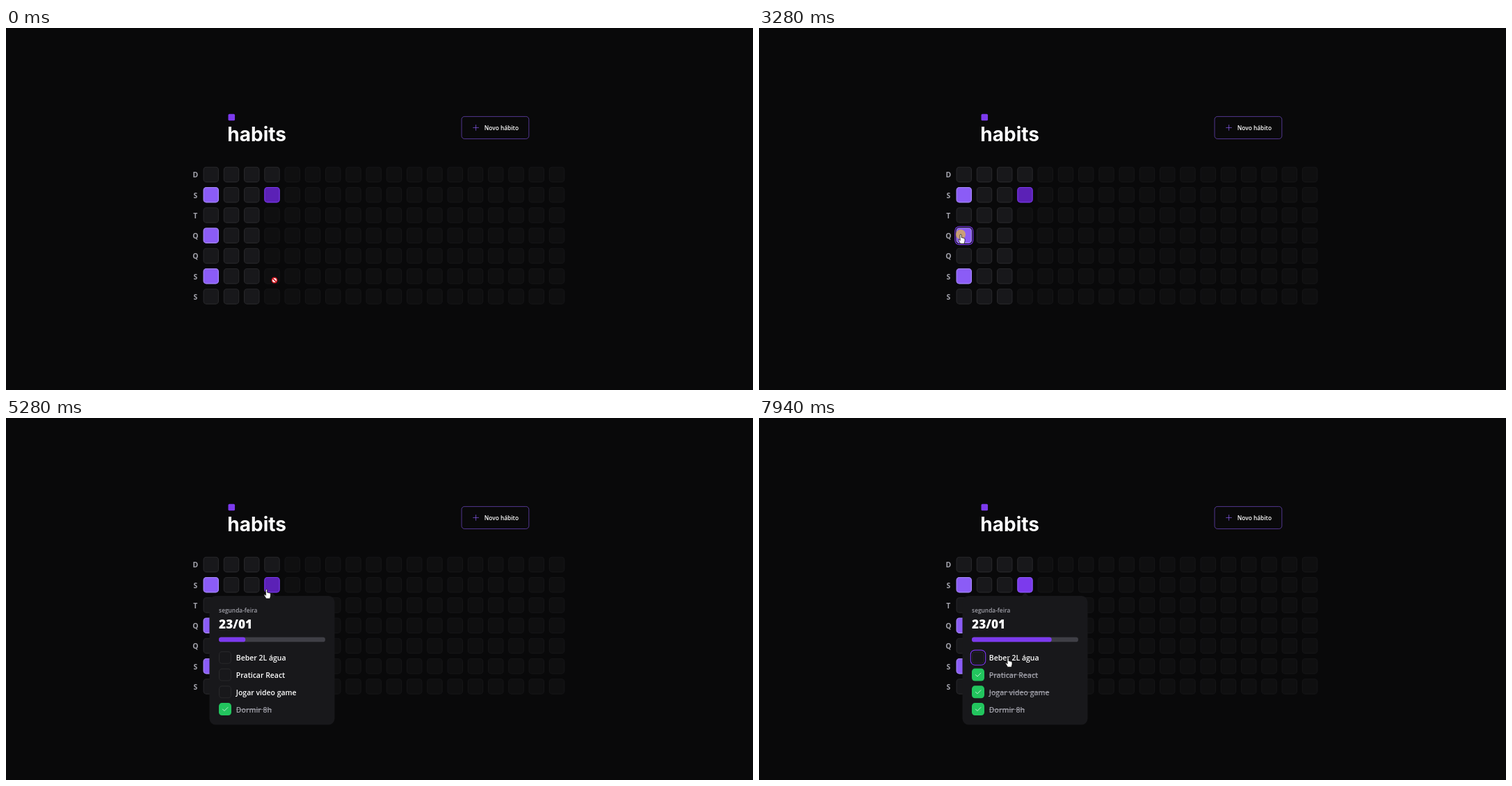
Recreate the animation shown at these times as an HTML page. Size 1074 by 521 pixels, loop 8000 ms.

```html
<!DOCTYPE html>
<html lang="pt-BR">
<head>
<meta charset="utf-8">
<title>habits</title>
<style>
* { box-sizing: border-box; }
html, body { margin: 0; width: 100%; height: 100%; overflow: hidden; background: #09090a; }
body { position: relative; }

/* Laid out at full page size, shown at 9/16 scale. */
#app {
  position: absolute; left: 0; top: 0; width: 1909px; height: 926px;
  transform: scale(.5625); transform-origin: 0 0;
  font: 600 14.8px/24px "Open Sans", "Noto Sans", sans-serif; color: #fff;
}
#app > * { position: absolute; }
span { position: relative; top: 1px; white-space: nowrap; }
svg { display: block; overflow: visible; fill: none; stroke-width: 1.25; stroke-linecap: round; stroke-linejoin: round; }

.mark { left: 568px; top: 219.5px; width: 17px; height: 17px; border-radius: 3px; background: #7c3aed; }
.title { left: 565.9px; top: 247.6px; font: 700 49.8px/1 Inter, sans-serif; }
.new {
  left: 1164px; top: 225.5px; width: 173px; height: 58px;
  display: flex; align-items: center; justify-content: center; gap: 12px;
  border: 1px solid #8b5cf6; border-radius: 8px;
}
.new svg { stroke: #8b5cf6; }

.day {
  width: 40px; height: 40px; display: flex; align-items: center; justify-content: center;
  font-size: 18.6px; font-weight: 700; color: #a1a1aa;
}
.cell { width: 40px; height: 40px; border: 2px solid #27272a; border-radius: 8px; background: #18181b; }
.off { opacity: .4; }
.full { background: #8b5cf6; border-color: #a78bfa; }
.ring { box-shadow: 0 0 0 2px #09090a, 0 0 0 4px #7c3aed; }

.pop { width: 320px; padding: 24px; border-radius: 16px; background: #18181b; z-index: 1; }
.pop::before {
  content: ""; position: absolute; left: 152px; top: -8px; width: 16px; height: 8px;
  background: inherit; clip-path: polygon(50% 0, 100% 100%, 0 100%);
}
.week { color: #a1a1aa; }
.date { margin-top: 4px; font-size: 30.6px; font-weight: 800; line-height: 37.5px; }
.track { margin: 16px 0 24px; height: 12px; border-radius: 12px; background: #3f3f46; }
.bar { height: 12px; border-radius: 12px; background: #7c3aed; }
.habit { display: flex; align-items: center; gap: 12px; font-size: 18.6px; }
.habit + .habit { margin-top: 12px; }
.box {
  width: 32px; height: 32px; display: flex; align-items: center; justify-content: center;
  border: 2px solid #27272a; border-radius: 8px; background: #18181b;
}
.box svg { stroke: #fff; visibility: hidden; }
.done { color: #a1a1aa; text-decoration: line-through; }
.done .box { background: #22c55e; border: 0; }
.done svg { visibility: inherit; }

#mouse { position: absolute; left: 0; top: 0; width: 1px; height: 1px; }
#mouse path { fill: #fff; stroke: #000; stroke-width: .7; }
</style>
</head>
<body>
<div id="app">
  <div class="mark"></div>
  <div class="title">habits</div>
  <div class="new">
    <svg width="20" height="20"><path d="M3.1 10H16.9M10 3.1V16.9"/></svg>
    <span>Novo hábito</span>
  </div>
</div>
<svg id="mouse">
  <circle id="halo" r="7" fill="#e2ba46" fill-opacity=".72"/>
  <path id="arrow" d="M0 0V8.8L2 7 3.3 10 4.7 9.4 3.4 6.5H6.1Z"/>
  <path id="hand" d="M-1.1 1.1Q-1.1 0 0 0T1.1 1.1V4.6L5 5.4Q6 5.8 6 7V9.6L5 13.4H-.4L-3.3 8.7Q-3.8 7.5-2.7 7.3L-1.1 8.6Z"/>
  <g id="deny" stroke="#d0141e" stroke-width="1.5">
    <circle r="3.7" fill="#fff"/><path d="M-2.4-2.4 2.4 2.4" style="stroke:#d0141e;stroke-width:1.5"/>
  </g>
</svg>
<script>
const LOOP = 8000, SCALE = 9 / 16;
const LEFT = 504.2, TOP = 355.2, PITCH = 52, COLS = 18;
const app = document.getElementById('app');
const [mouse, halo, arrow, hand, deny] =
  ['mouse', 'halo', 'arrow', 'hand', 'deny'].map(id => document.getElementById(id));

function add(cls, x, y, html = '') {
  const el = document.createElement('div');
  el.className = cls;
  el.style.left = x + 'px';
  el.style.top = y + 'px';
  el.innerHTML = html;
  return app.appendChild(el);
}

const isOff = (col, row) => col > 3 || (col === 3 && row > 1);
const cells = [];
[...'DSTQQSS'].forEach((letter, row) => {
  const y = TOP + row * PITCH;
  add('day', LEFT - 40, y, `<span>${letter}</span>`);
  cells[row] = [];
  for (let col = 0; col < COLS; col++) {
    const full = col === 0 && [1, 3, 5].includes(row);
    const cls = 'cell' + (isOff(col, row) ? ' off' : full ? ' full' : '');
    cells[row][col] = add(cls, LEFT + col * PITCH, y);
  }
});

function popover(col, row, week, date, habits, open, close) {
  const x = LEFT + col * PITCH - 140, y = TOP + row * PITCH + 48;
  const list = habits.map(name => `<div class="habit"><div class="box">
    <svg width="20" height="20"><path d="M16.9 5.6 8.1 14.4 3.75 10"/></svg></div><span>${name}</span></div>`);
  const el = add('pop', x, y, `<div class="week"><span>${week}</span></div>
    <div class="date"><span>${date}</span></div>
    <div class="track"><div class="bar"></div></div>${list.join('')}`);
  return { el, x, y, open, close, habits: [...el.querySelectorAll('.habit')] };
}

const pops = [
  popover(0, 1, 'segunda-feira', '02/01', ['Beber 2L água'], 1560, 2235),
  popover(0, 3, 'quarta-feira', '04/01', ['Beber 2L água'], 3420, 4100),
  popover(3, 1, 'segunda-feira', '23/01',
    ['Beber 2L água', 'Praticar React', 'Jogar video game', 'Dormir 8h'], 5080, LOOP)
];
pops[0].habits[0].classList.add('done');
pops[1].habits[0].classList.add('done');

const [water, react, game, sleep] = pops[2].habits;
sleep.classList.add('done');
const bar = pops[2].el.querySelector('.bar');
const today = cells[1][3];

// Pointer stops: time, x, y.
const path = [
  [0, 386, 363], [340, 249, 322], [600, 249, 322], [1020, 283, 238], [1300, 283, 238],
  [1400, 288, 241], [1620, 288, 241], [2100, 147, 240], [2170, 146, 240], [2430, 146, 240],
  [2910, 278, 297], [2980, 278, 297], [3050, 290, 297], [3560, 290, 297], [3900, 175, 439],
  [4330, 175, 439], [4800, 373, 248], [4870, 375, 245], [5250, 375, 245], [5680, 341, 347],
  [5950, 353, 397], [6100, 353, 397], [6220, 356, 395], [6480, 356, 395], [6710, 352, 365],
  [7300, 352, 365], [7450, 352, 367], [7610, 352, 366], [7740, 352, 366], [7940, 358, 345],
  [LOOP, 358, 345]
];
const clicks = [[1420, 1560], [2235, 2380], [3280, 3420], [4100, 4240], [4940, 5080], [6290, 6430], [7040, 7180]];

const within = (t, a, b) => t >= a && t < b;
const ease = p => { p = Math.min(1, Math.max(0, p)); return p * p * (3 - 2 * p); };

function pointer(t) {
  const i = path.findIndex(stop => stop[0] > t);
  const [t0, x0, y0] = path[i - 1], [t1, x1, y1] = path[i];
  const p = ease((t - t0) / (t1 - t0));
  return [x0 + (x1 - x0) * p, y0 + (y1 - y0) * p];
}

// Picks the cursor from whatever lies below it.
function cursorAt(t, px, py) {
  const x = px / SCALE, y = py / SCALE;
  const pop = pops.find(p => within(t, p.open, p.close));
  if (pop && within(x, pop.x, pop.x + 320) && within(y, pop.y, pop.y + pop.el.offsetHeight)) {
    const overRow = within(x, pop.x + 24, pop.x + 240) && y > pop.y + 141;
    return pop === pops[2] && overRow ? hand : arrow;
  }
  const col = Math.floor((x - LEFT) / PITCH), row = Math.floor((y - TOP) / PITCH);
  const onCell = within(col, 0, COLS) && within(row, 0, 7) &&
    x - LEFT - col * PITCH < 40 && y - TOP - row * PITCH < 40;
  return !onCell ? arrow : isOff(col, row) ? deny : hand;
}

const show = (el, on) => { el.style.visibility = on ? 'visible' : 'hidden'; };
const ring = (el, on) => el.classList.toggle('ring', on);

function render(t) {
  pops.forEach(p => show(p.el, within(t, p.open, p.close)));

  ring(cells[1][0], within(t, 1420, 1560));
  ring(cells[3][0], within(t, 3280, 3420));
  ring(today, within(t, 4940, 5080));
  ring(game.firstChild, within(t, 6290, 6970));
  ring(react.firstChild, within(t, 6970, 7940));
  ring(water.firstChild, t >= 7940);

  game.classList.toggle('done', t >= 6430);
  react.classList.toggle('done', t >= 7180);
  const first = ease((t - 6430) / 150), second = ease((t - 7180) / 150);
  bar.style.width = 25 * (1 + first + second) + '%';
  today.style.background = `color-mix(in srgb, #7c3aed ${first * 100}%, #5b21b6)`;
  today.style.borderColor = `color-mix(in srgb, #8b5cf6 ${first * 100}%, #7c3aed)`;

  const [x, y] = pointer(t), active = cursorAt(t, x, y);
  mouse.style.transform = `translate(${x}px, ${y}px)`;
  [arrow, hand, deny].forEach(el => show(el, el === active));
  show(halo, clicks.some(([a, b]) => within(t, a, b)));
}

const start = performance.now();
function tick() {
  render((performance.now() - start) % LOOP);
  requestAnimationFrame(tick);
}
tick();
</script>
</body>
</html>
```
